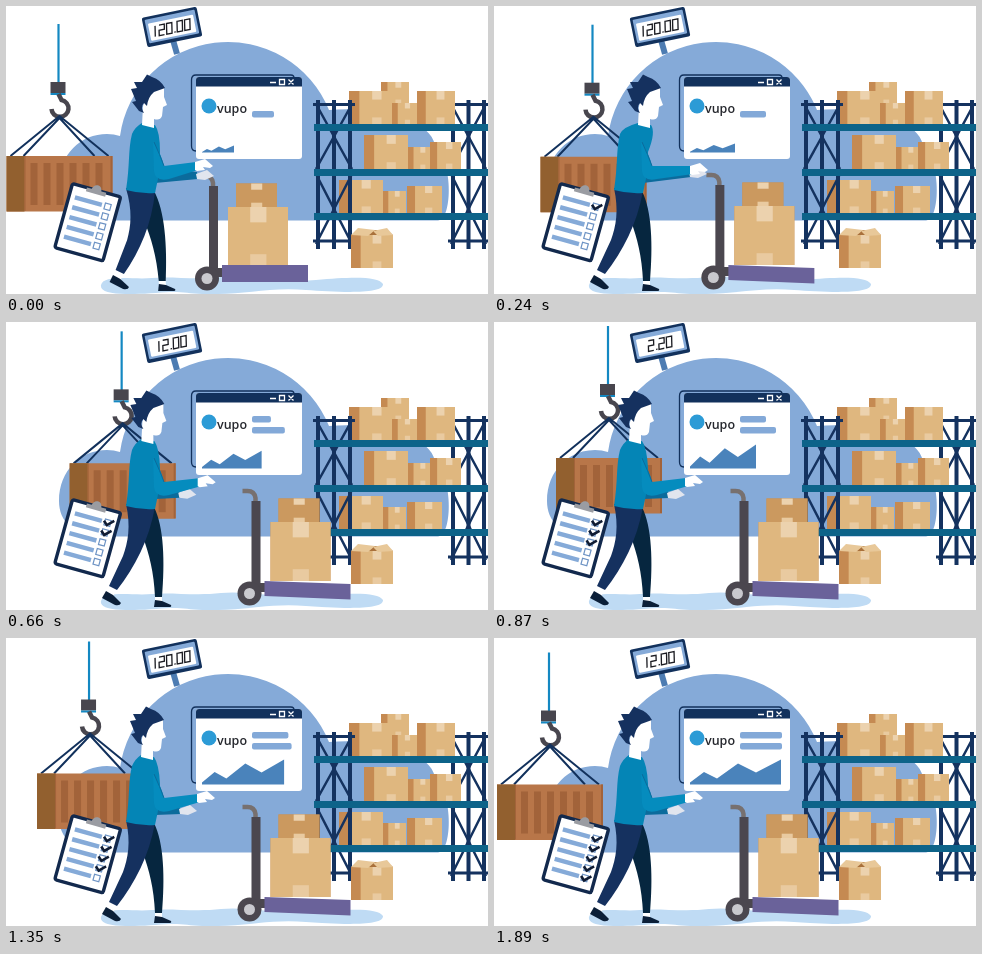
An HTML page that plays this animation: 482x288 px, repeating every 2.13 s.

```html
<!DOCTYPE html>
<html lang="en">
<head>
<meta charset="utf-8">
<title>Warehouse</title>
<style>
html, body { margin: 0; width: 100%; height: 100%; overflow: hidden; background: #fff; }
svg { display: block; width: 482px; height: 288px; }
</style>
</head>
<body>
<svg viewBox="0 0 482 288" fill="none">
  <path fill="#bfdbf4" d="M95 279C98 268 128 274 146 272S190 274 215 271 275 277 310 274 372 270 377 278C378 289 330 286 300 284 266 281 240 288 212 288 180 289 180 284 150 287 120 289 93 289 95 279Z"/>
  <path fill="#85aad8" d="M95 214.500C67 214.500 53 199 53 179 53 148 75 128 101 128Q108 128 114 130A109 109 0 0 1 323 104C375 100 424 114 429 139 448 158 446 214.500 432 214.500Z"/>
  <g id="shelf"></g>

  <path stroke="#12315c" stroke-width="1.300" d="M190 145Q185.500 145 185.500 140V74Q185.500 69 190 69H285Q288 69 288 72"/>
  <rect x="190" y="71" width="106" height="82" rx="3" fill="#fff"/>
  <path fill="#12315c" d="M190 80.500V74Q190 71 193 71H293Q296 71 296 74V80.500Z"/>
  <path stroke="#fff" stroke-width="1.300" d="M264 76.500H270M273.500 73.500H278.500V78.500H273.500ZM282.500 73.500 287.500 78.500M287.500 73.500 282.500 78.500"/>
  <circle cx="203" cy="100" r="7.500" fill="#2c9bd6"/>
  <text x="211" y="107" font-family="'Open Sans', sans-serif" font-weight="600" font-size="12.500" fill="#26282e">vupo</text>
  <rect id="barA" x="246" y="94" height="6.500" rx="2" fill="#83a9d8"/>
  <rect id="barB" x="246" y="105" height="6.500" rx="2" fill="#83a9d8"/>
  <path id="chart" fill="#4a83bb" d="M0 0V-2L14-12.500 27-6 48-21 66-12 91-25V0Z"/>

  <path stroke="#4d7cb2" stroke-width="6" d="M167 34 171 48"/>
  <g transform="translate(166 21) rotate(-11.500)">
    <rect x="-28" y="-15" width="56" height="30" rx="2" fill="#12315c"/>
    <rect x="-25.500" y="-12.500" width="51" height="24" rx="1" fill="#85aad8"/>
    <rect x="-23" y="-8" width="46" height="17.500" rx="1" fill="#fff"/>
    <path id="digits" transform="translate(1 -4.500) skewX(-10)" stroke="#1b1c22" stroke-width="1.350"/>
  </g>

  <g id="crane">
    <path stroke="#1488c2" stroke-width="2.200" d="M52 18V77"/>
    <path fill="#48464e" d="M44 76H59V87H44Z"/>
    <path fill="#1488c2" d="M44 87H59V89H44Z"/>
    <path stroke="#48464e" stroke-width="4.500" d="M52 88 55 94A8.500 8.500 0 1 1 45 103"/>
    <path stroke="#12315c" stroke-width="2" d="M4 150 53 110 102 150M17 150 53 112 88 150"/>
    <path fill="#b87649" d="M0 150H106V205.500H0Z"/>
    <path fill="#92602f" d="M0 150H18V205.500H0Z"/>
    <path id="ribs" fill="#a2633a"/>
  </g>

  <g transform="translate(66.500 177.500) rotate(15.500)">
    <rect width="50" height="66.500" rx="2" fill="#fff" stroke="#12294d" stroke-width="3.400"/>
    <path fill="#9a9ca2" d="M15 4V0H20Q21-5 25-5T30 0H35V4Z"/>
    <g id="rows"></g>
  </g>

  <g id="cart">
    <path stroke="#77706f" stroke-width="4.500" d="M207 184V177Q206 170 199 170H194"/>
    <path fill="#4b474f" d="M203 180H212V266H203Z"/>
    <path fill="#4b474f" d="M203 262H217V271H203Z"/>
    <g id="load"></g>
    <path id="deck" fill="#6a629a"/>
    <circle cx="201" cy="272.500" r="12" fill="#4b474f"/>
    <circle cx="201" cy="272.500" r="5.500" fill="#c9c9ce"/>
  </g>

  <g id="legR">
    <path fill="#fff" d="M149 272H156V280H149Z"/>
    <path fill="#0b1f38" d="M149 278 156 279 165 283Q166 285 163 285H148Z"/>
    <path fill="#06263f" d="M132 200 148 185C158 205 159 240 156 275L149 275C148 250 143 232 137 215Z"/>
  </g>
  <g id="legL">
    <path fill="#fff" d="M104 262 111 266 107 275 101 270Z"/>
    <path fill="#0b1f38" d="M100 269 107 273 115 281Q114 284 109 283L96 276Z"/>
    <path fill="#15315f" d="M120 182C125 205 122 220 117 234L103 264 111 268C129 245 143 218 149 185Z"/>
  </g>
  <path id="backArm" fill="#0b6b9c"/>
  <path id="backHand" fill="#e1e5ee" d="M-9-1 2-5 9 1 0 5-8 4Z"/>
  <path id="torso" fill="#0485b6"/>
  <g id="head">
    <path fill="#fff" d="M141 86 157 81 157 91 160 99 156 101 155 110Q153 115 147 113L147 122 135 119 136 100Z"/>
    <path fill="#15315f" d="M124 83 130 82 127 76 135 76 140 68.500 145 71Q154 74 158 82L147 86Q141 91 140 100L137 97Q133 101 137 107L132 105 125 96 129 95Z"/>
  </g>
  <path id="arm" fill="#058cbe"/>
  <path stroke="#0b6b9c" d="M148 136Q154 149 158 160"/>
  <path id="hand" fill="#fff" d="M-2-4 8-7 16 0 13 2 6 1 8 4 0 5-2 4Z"/>
</svg>
<script>
const $ = id => document.getElementById(id);
const set = (id, name, value) => $(id).setAttribute(name, value);
const move = (id, x, y) => set(id, 'transform', `translate(${x} ${y})`);
const rect = (x, y, w, h, fill) =>
  `<rect x="${x}" y="${y}" width="${w}" height="${h}" fill="${fill}"/>`;
const line = (d, width, color) =>
  `<path d="${d}" stroke="${color}" stroke-width="${width}"/>`;

// A carton with a shaded left side and tape at top and bottom
function box(x, y, w, h, side = w * .23, front = '#dfb77f') {
  const fx = x + side, fw = w - side, tx = fx + fw * .37, tw = fw * .27;
  return rect(x, y, w, h, '#c58a52') + rect(fx, y, fw, h, front) +
    rect(tx, y, tw, h * .26, '#ecd2ae') + rect(tx, y + h * .8, tw, h * .2, '#e9caa0');
}

const navy = '#14325f';
const brace = (x, w) => [[98, 163], [168, 238]].map(([a, b]) =>
  line(`M${x} ${a}L${x + w} ${b}M${x + w} ${a}L${x} ${b}`, 2.500, navy)).join('');
const frame = (x, w) => brace(x + 3, w - 6) +
  line(`M${x} 98.500h${w}M${x} 235h${w}`, 3, navy) +
  [3, w / 2 - 2, w - 7].map(dx => rect(x + dx, 94, 4, 149, navy)).join('');
const cartons = [
  [375, 76, 28, 22], [343, 85, 45, 33], [386, 97, 25, 21], [411, 85, 38, 33],
  [358, 129, 44, 34], [402, 141, 24, 22], [424, 136, 31, 27],
  [333, 174, 44, 33], [377, 185, 23, 22], [401, 180, 35, 27]
];
$('shelf').innerHTML = frame(442, 41) +
  cartons.map(c => box(...c)).join('') + frame(307, 42) +
  [118, 163, 207].map(y => rect(308, y, 174, 7, '#0d6389')).join('') +
  box(345, 229, 42, 33) +
  '<path fill="#a9713c" d="M345 229 354 224H380L387 229Z"/>' +
  '<path fill="#e8c899" d="M345 229 352 222 369 224 362 230ZM387 229 381 222 367 225 372 230Z"/>';

$('load').innerHTML = box(230, 177.5, 41, 24, 0, '#cb995f') + box(222, 201, 60, 59, 0);

let ribs = '';
for (let x = 24; x < 100; x += 13) ribs += `M${x} 157h7v42h-7z`;
set('ribs', 'd', ribs + 'M18 150h1v55h-1zM104 150h2v55h-2z');

const rows = [0, 1, 2, 3, 4].map(i => 13 + i * 10.2);
$('rows').innerHTML = rows.map((y, i) =>
  rect(6, y - 2.5, 28, 4.5, '#85aad8') +
  line(`M37 ${y - 3}h6v6h-6z`, 1.2, '#6d93c4') +
  `<path id="tick${i}" d="M36 ${y - 1}l4 3.500 6-6" stroke="#101c33" stroke-width="2.600"/>`
).join('');

// Glyph path and advance for the scale display
const glyphs = {
  0: ['h5.400v10.500h-5.400z', 7.700], 1: ['m1 0v10.500', 5], '.': ['m0 10h1.500', 3],
  2: ['h5.400v5.200h-5.400v5.300h5.400', 7.700]
};
function digits(text) {
  let x = -[...text].reduce((sum, c) => sum + glyphs[c][1], -2) / 2, d = '';
  for (const c of text) {
    d += `M${x} 0${glyphs[c][0]}`;
    x += glyphs[c][1];
  }
  return d;
}

// Smooth curve through values at shared key times
const keys = [0, 240, 480, 870, 1110, 1590, 1890];
function track(t, ...v) {
  const last = keys.length - 1;
  let i = 0;
  while (i < last - 1 && t > keys[i + 1]) i++;
  const slope = k => (v[k + 1] - v[k]) / (keys[k + 1] - keys[k]);
  const tangent = k => {
    if (k === 0) return slope(0);
    if (k === last) return slope(k - 1);
    if (!slope(k - 1) || !slope(k)) return 0;
    return (v[k + 1] - v[k - 1]) / (keys[k + 1] - keys[k - 1]);
  };
  const d = keys[i + 1] - keys[i], u = (t - keys[i]) / d, w = 1 - u;
  return v[i] * w * w * (1 + 2 * u) + v[i + 1] * u * u * (1 + 2 * w) +
    d * u * w * (tangent(i) * w - tangent(i + 1) * u);
}

function draw(t) {
  move('crane', track(t, 0.5, 46.5, 61, 62, 48, 15, 3), track(t, 0, .7, -4, -14, -18, -9.5, -3.5));

  const start = Math.min(1, t / 240);
  move('cart', Math.min(42.5, t * .0765), -start);
  set('deck', 'd', `M216 ${259 + start}L302 ${259 + 4 * start}V${276 + 2.5 * start}L216 ${276 - start}Z`);

  rows.forEach((_, i) => set(`tick${i}`, 'visibility', t >= 80 + i * 390 ? 'visible' : 'hidden'));
  set('digits', 'd', digits(['120.00', '12.00', '2.20'][Math.floor(t / 420) % 3]));

  const sx = track(t, 32, 45, 54, 66, 74, 89, 91) / 91;
  const sy = track(t, 7, 9, 12, 24, 25, 25, 25) / 25;
  set('chart', 'transform', `translate(196 146.500) scale(${sx} ${sy})`);
  set('barA', 'width', Math.max(0, track(t, 0, 0, 12, 26, 32, 40, 42)));
  set('barB', 'width', track(t, 22, 26, 30, 36, 39, 40, 42));

  const lean = track(t, 1, 9, 2, 0, 0, 0, 0);
  move('head', lean, 0);
  set('torso', 'd', `M${135 + lean} 117Q${141 + lean} 121 ${148 + lean} 119Q${153 + lean} 126 154 146L153 168 149 187Q134 188 120 184C124 160 122 143 126 128Q129 121 ${135 + lean} 117Z`);

  const x = 193 + track(t, -2, 5, 2, 0, 0, 0, 0);
  const y = 160 + track(t, 0, 4, 1, 0, 0, 0, 0);
  set('arm', 'd', `M147 135Q155 147 158 160L${x - 1} ${y - 4} ${x + 1} ${y + 4} 163 173Q149 176 148 165Z`);
  move('hand', x, y);

  const bx = track(t, 199, 204, 184, 182, 182, 182, 182);
  const by = track(t, 169, 167, 171, 172, 172, 172, 172);
  set('backArm', 'd', `M145 160 ${bx - 8} ${by - 3} ${bx - 7} ${by + 4} 149 177Z`);
  move('backHand', bx, by);

  // Feet slide back while the hips stay put
  const leg = (id, dx) => set(id, 'transform', `translate(${-dx * 1.87} 0) matrix(1 0 ${dx / 98} 1 0 0)`);
  leg('legL', 8 * (1 - start));
  leg('legR', 4 * (1 - start));
}

const began = performance.now();
function tick() {
  const t = (performance.now() - began) % 2130;
  draw(Math.min(1890, Math.floor(t / 30) * 30));
  requestAnimationFrame(tick);
}
tick();
</script>
</body>
</html>
```
